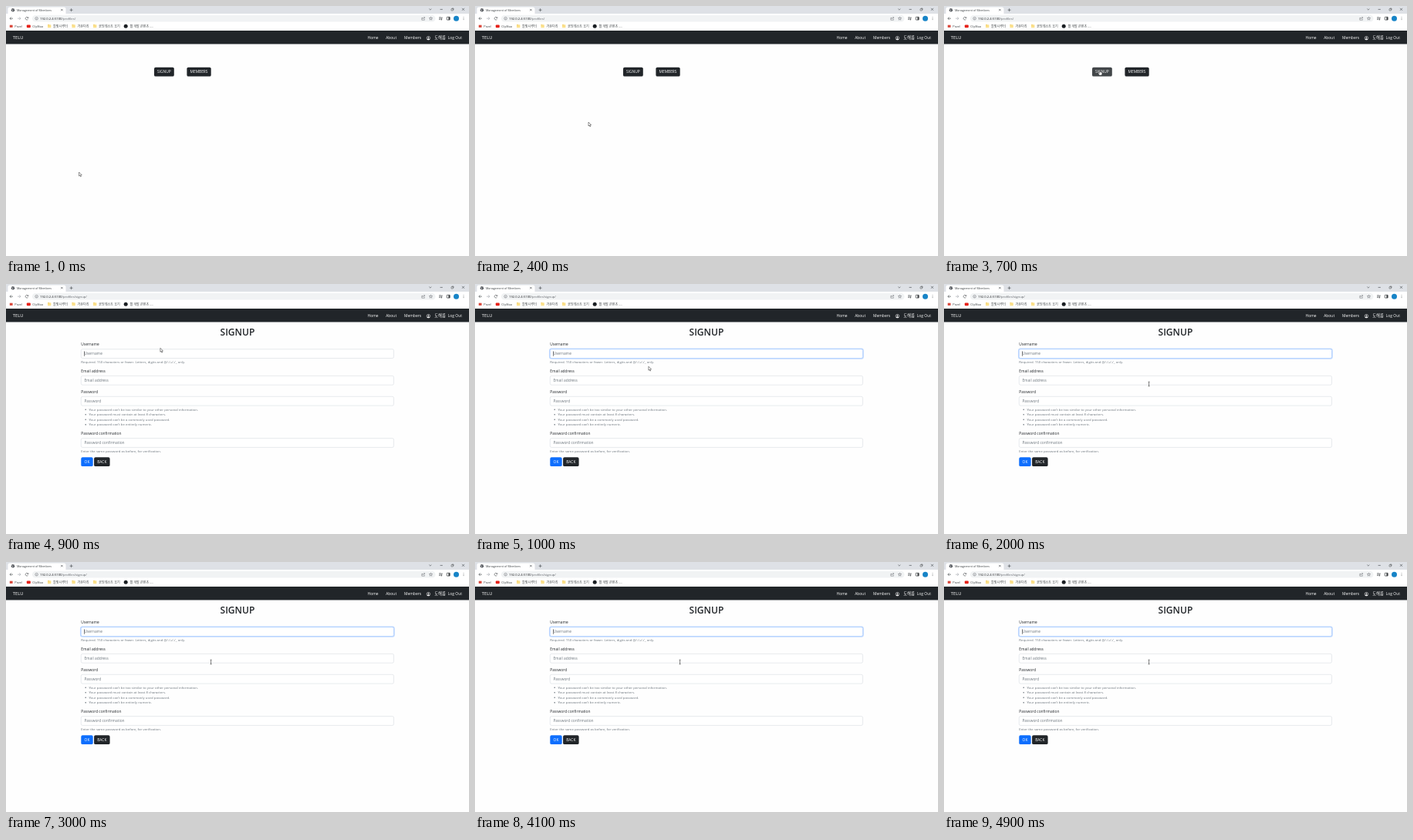
These frames come from a looping animation (600x325 px, 5 s). An HTML page with a canvas:

```html
<!DOCTYPE html>
<html lang="ko">
<head>
<meta charset="utf-8">
<title>Management of Members</title>
<style>
html, body { margin: 0; width: 100%; height: 100%; overflow: hidden; background: #fefefe; }
canvas { display: block; width: 600px; height: 325px; }
</style>
</head>
<body>
<canvas id="stage"></canvas>
<script>
const W = 600, H = 325, LOOP = 5000;
const SANS = '"Open Sans", "Noto Sans CJK KR", "Noto Sans CJK", sans-serif';
const DARK = '#212529', HOVER = '#424649', MUTED = '#6c757d', INK = '#3c4043';
const LABEL = 4.85, HELP = 4.32, NAV = 4.95;

const canvas = document.getElementById('stage');
const ctx = canvas.getContext('2d');
const ratio = window.devicePixelRatio || 1;
canvas.width = W * ratio;
canvas.height = H * ratio;

// [time, x, y, shape]: pointer position held until the next entry
const POINTER = [
  [0, 94.6, 216, 'arrow'], [200, 98, 212, 'arrow'], [300, 115, 191, 'arrow'],
  [400, 147, 151, 'arrow'], [500, 179, 111, 'arrow'], [600, 198, 89, 'hand'],
  [700, 202, 84, 'hand'], [900, 199.9, 83.3, 'arrow'], [1000, 224.9, 107.2, 'arrow'],
  [1100, 249, 124, 'beam'], [1200, 262, 132, 'arrow'], [1400, 265.6, 130, 'beam']
];
// Times at which the text caret turns on or off
const BLINKS = [900, 1500, 2000, 2500, 3000, 3600, 4100];
const TYPED = [[4300, 'r'], [4500, 'ri'], [4800, 'r'], [4900, '']];

const lastAt = (list, t) => list.filter(e => e[0] <= t).pop();

function rect(x, y, w, h, color) {
  ctx.fillStyle = color;
  ctx.fillRect(x, y, w, h);
}

function round(x, y, w, h, r, fill, stroke, lw = 0.5) {
  ctx.beginPath();
  ctx.roundRect(x, y, w, h, r);
  if (fill) { ctx.fillStyle = fill; ctx.fill(); }
  if (stroke) { ctx.strokeStyle = stroke; ctx.lineWidth = lw; ctx.stroke(); }
}

function circle(x, y, r, fill, stroke, lw = 0.6) {
  ctx.beginPath();
  ctx.arc(x, y, r, 0, Math.PI * 2);
  if (fill) { ctx.fillStyle = fill; ctx.fill(); }
  if (stroke) { ctx.strokeStyle = stroke; ctx.lineWidth = lw; ctx.stroke(); }
}

function line(points, color = INK, lw = 0.6) {
  ctx.beginPath();
  for (let i = 0; i < points.length; i += 2) ctx.lineTo(points[i], points[i + 1]);
  ctx.strokeStyle = color;
  ctx.lineWidth = lw;
  ctx.stroke();
}

// Draws text centred on cy; laid out large and scaled down for exact spacing. Returns its width.
function text(str, x, cy, size, color = DARK, align = 'left', weight = 400) {
  ctx.save();
  ctx.translate(x, cy + size * 0.357);
  ctx.scale(0.1, 0.1);
  ctx.font = `${weight} ${size * 10}px ${SANS}`;
  ctx.textAlign = align;
  ctx.fillStyle = color;
  ctx.fillText(str, 0, 0);
  const width = ctx.measureText(str).width / 10;
  ctx.restore();
  return width;
}

function drawTabs() {
  rect(0, 0, W, 10.5, '#dee1e6');
  round(2.5, 1.5, 75, 10, [2.5, 2.5, 0, 0], '#fff');
  circle(9, 5.2, 2.2, '#4d5156');
  line([7.6, 4.6, 9, 5.4, 8.6, 6.6], '#fff', 0.7);
  line([9.6, 3.5, 10.4, 4.5], '#fff', 0.6);
  text('Management of Members', 14, 5.2, 3.72, INK);
  line([71.2, 3.9, 73.6, 6.3]);
  line([73.6, 3.9, 71.2, 6.3]);
  line([82.6, 5.2, 86.6, 5.2]);
  line([84.6, 3.2, 84.6, 7.2]);
  line([548.3, 3.6, 549.8, 5, 551.3, 3.6]);
  line([562.6, 4.4, 565.8, 4.4]);
  round(577, 3.6, 2.4, 2.4, 0.3, null, INK);
  line([577.8, 3, 580, 3, 580, 5.2], INK, 0.5);
  line([591, 2.8, 594, 5.8]);
  line([594, 2.8, 591, 5.8]);
}

function drawToolbar(url) {
  rect(0, 10, W, 22, '#fff');
  line([9, 16.2, 5, 16.2]);
  line([6.8, 14.4, 5, 16.2, 6.8, 18]);
  line([15, 16.2, 19, 16.2], '#9aa0a6');
  line([17.2, 14.4, 19, 16.2, 17.2, 18], '#9aa0a6');
  ctx.beginPath();
  ctx.arc(27, 16.2, 1.8, 0.5, 5.5);
  ctx.strokeStyle = INK;
  ctx.lineWidth = 0.6;
  ctx.stroke();
  line([28.9, 14.2, 28.9, 15.6, 27.4, 15.6]);

  round(34, 11.9, 522.5, 8.6, 4.3, '#f1f3f4');
  circle(39.6, 16.2, 1.8, null, '#5f6368', 0.5);
  line([39.6, 15.9, 39.6, 17.2], '#5f6368', 0.5);
  const host = '192.0.2.4:5100';
  text(url, 44 + text(host, 44, 16.3, 4.2, '#202124'), 16.3, 4.2, '#5f6368');

  line([540, 15.4, 538.8, 15.4, 538.8, 18.2, 542.4, 18.2, 542.4, 17], '#5f6368', 0.5);
  line([540, 17, 540.6, 15.4, 542.8, 15.2], '#5f6368', 0.5);
  line([541.7, 14, 543, 15.2, 541.7, 16.4], '#5f6368', 0.5);
  const star = [];
  for (let i = 0; i <= 10; i++) {
    const a = i * Math.PI / 5 - Math.PI / 2, r = i % 2 ? 1 : 2.3;
    star.push(550.5 + r * Math.cos(a), 16.3 + r * Math.sin(a));
  }
  line(star, '#5f6368', 0.5);
  line([561, 14.8, 564.2, 14.8]);
  line([561, 16.2, 564.2, 16.2]);
  line([561, 17.6, 562.8, 17.6]);
  line([564.7, 17.8, 564.7, 15, 565.8, 15]);
  circle(564.2, 17.7, 0.7, INK);
  round(571.2, 14.3, 4, 3.8, 0.4, null, INK, 0.7);
  rect(573.4, 14.3, 1.8, 3.8, INK);
  circle(583.5, 16.2, 3.5, '#1784c7');
  for (let i = 0; i < 3; i++) circle(593, 14.6 + i * 1.6, 0.45, INK);
}

function drawBookmarks() {
  const y = 26.3;
  rect(4.8, y - 1.6, 3.8, 3.2, '#d9483b');
  text('Pozel', 11.3, y, 3.9, INK);
  round(26.8, y - 1.9, 5, 3.8, 1, '#e62117');
  text('ClipNua', 34.2, y, 3.8, INK);
  for (const [x, name] of [[54, '들빛나루터'], [85.4, '가온다리'], [113, '코딩테스트 후기']]) {
    round(x, y - 2, 4.4, 4, 0.5, '#fbe08a');
    rect(x, y - 2, 2, 0.7, '#efc95c');
    text(name, x + 7, y, 4.15, INK);
  }
  circle(155.2, y, 2.5, '#1b1f23');
  text('웹 개발 콘텐츠 -…', 160.4, y, 4.1, INK);
}

function drawNav() {
  rect(0, 32, W, 17.6, DARK);
  rect(0, 49.6, W, 0.5, '#c9cbcc');
  const y = 41.2;
  text('TELU', 8.8, y, 5.8, '#fff');
  text('Home', 468.5, y, NAV, '#fff');
  text('About', 492.2, y, NAV, '#fff');
  text('Members', 516, y, NAV, '#fff');
  circle(547.4, 41.7, 2.3, null, '#fff', 0.5);
  circle(547.4, 41.1, 0.8, '#fff');
  ctx.beginPath();
  ctx.arc(547.4, 43.9, 1.7, Math.PI, 0);
  ctx.fillStyle = '#fff';
  ctx.fill();
  text('도해름', 555.2, y, 5.3, '#fff');
  text('Log Out', 572.8, y, NAV, '#fff');
}

function button(label, x, y, w, color) {
  round(x, y, w, 11.9, 1.9, color);
  text(label, x + w / 2, y + 6, LABEL, '#fff', 'center');
}

function drawHome(t) {
  const signup = t >= 700 ? HOVER : t >= 600 ? '#33373a' : DARK;
  button('SIGNUP', 192, 79.7, 25.8, signup);
  button('MEMBERS', 234.4, 79.7, 31.3, DARK);
}

function field(label, labelY, y, value = '', focused = false) {
  text(label, 97.3, labelY, LABEL);
  if (focused) round(96.6, y - 0.6, 406.6, 13, 2.4, null, 'rgba(13,110,253,.25)', 1.25);
  round(97.3, y, 405.2, 11.8, 1.9, '#fff', focused ? '#86b7fe' : '#ced4da', 0.5);
  return text(value || label, 101.4, y + 6, LABEL, value ? DARK : MUTED);
}

function drawForm(t) {
  text('SIGNUP', 300, 63.1, 12.1, DARK, 'center', 600);

  const value = (lastAt(TYPED, t) || [0, ''])[1];
  const width = field('Username', 78.5, 84.7, value, t >= 1000);
  const caretOn = t >= 4300 || BLINKS.filter(b => b <= t).length % 2 === 1;
  if (caretOn) rect(101.4 + (value ? width : 0), 87.4, 0.5, 6.4, '#000');
  text('Required. 150 characters or fewer. Letters, digits and @/./+/-/_ only.', 97.3, 101.3, HELP, MUTED);

  field('Email address', 113.4, 119.4);
  field('Password', 140.2, 146.3);
  const rules = [
    'Your password can’t be too similar to your other personal information.',
    'Your password must contain at least 8 characters.',
    'Your password can’t be a commonly used password.',
    'Your password can’t be entirely numeric.'
  ];
  rules.forEach((rule, i) => {
    const y = 163 + i * 6.55;
    circle(103.2, y + 0.2, 0.8, MUTED);
    text(rule, 107.4, y, HELP, MUTED);
  });

  field('Password confirmation', 194.5, 200.6);
  text('Enter the same password as before, for verification.', 97.3, 217.3, HELP, MUTED);
  button('OK', 97.3, 225.2, 15.4, '#0d6efd');
  button('BACK', 114.1, 225.2, 20.5, DARK);
}

const SHAPES = {
  arrow() {
    ctx.beginPath();
    for (const [x, y] of [[0, 0], [0, 5], [1.15, 4], [2, 5.9], [2.8, 5.5], [2, 3.7], [3.6, 3.6]]) ctx.lineTo(x, y);
    ctx.closePath();
    ctx.fillStyle = '#fff';
    ctx.fill();
    ctx.strokeStyle = '#222';
    ctx.lineWidth = 0.5;
    ctx.stroke();
  },
  hand() {
    ctx.beginPath();
    for (const [x, y] of [[-0.6, 0], [0.4, 0], [0.5, 2], [2.8, 2.6], [2.8, 4.4], [2.1, 6], [-0.6, 6], [-2.2, 3.6], [-1.6, 3], [-0.6, 3.7]]) ctx.lineTo(x, y);
    ctx.closePath();
    ctx.fillStyle = '#fff';
    ctx.fill();
    ctx.strokeStyle = '#222';
    ctx.lineWidth = 0.35;
    ctx.stroke();
  },
  beam() {
    line([0, -2.7, 0, 2.7], '#222', 0.6);
    line([-1.1, -2.8, 1.1, -2.8], '#222', 0.5);
    line([-1.1, 2.8, 1.1, 2.8], '#222', 0.5);
  }
};

function drawPointer(t) {
  const [, x, y, shape] = lastAt(POINTER, t);
  ctx.save();
  ctx.translate(x, y);
  SHAPES[shape]();
  ctx.restore();
}

function draw(t) {
  const onForm = t >= 900;
  ctx.setTransform(ratio, 0, 0, ratio, 0, 0);
  rect(0, 0, W, H, '#fefefe');
  drawTabs();
  drawToolbar(onForm ? '/profiles/signup/' : '/profiles/');
  drawBookmarks();
  drawNav();
  if (onForm) drawForm(t); else drawHome(t);
  drawPointer(t);
}

const start = performance.now();
function tick() {
  draw((performance.now() - start) % LOOP);
  requestAnimationFrame(tick);
}
tick();
</script>
</body>
</html>
```
